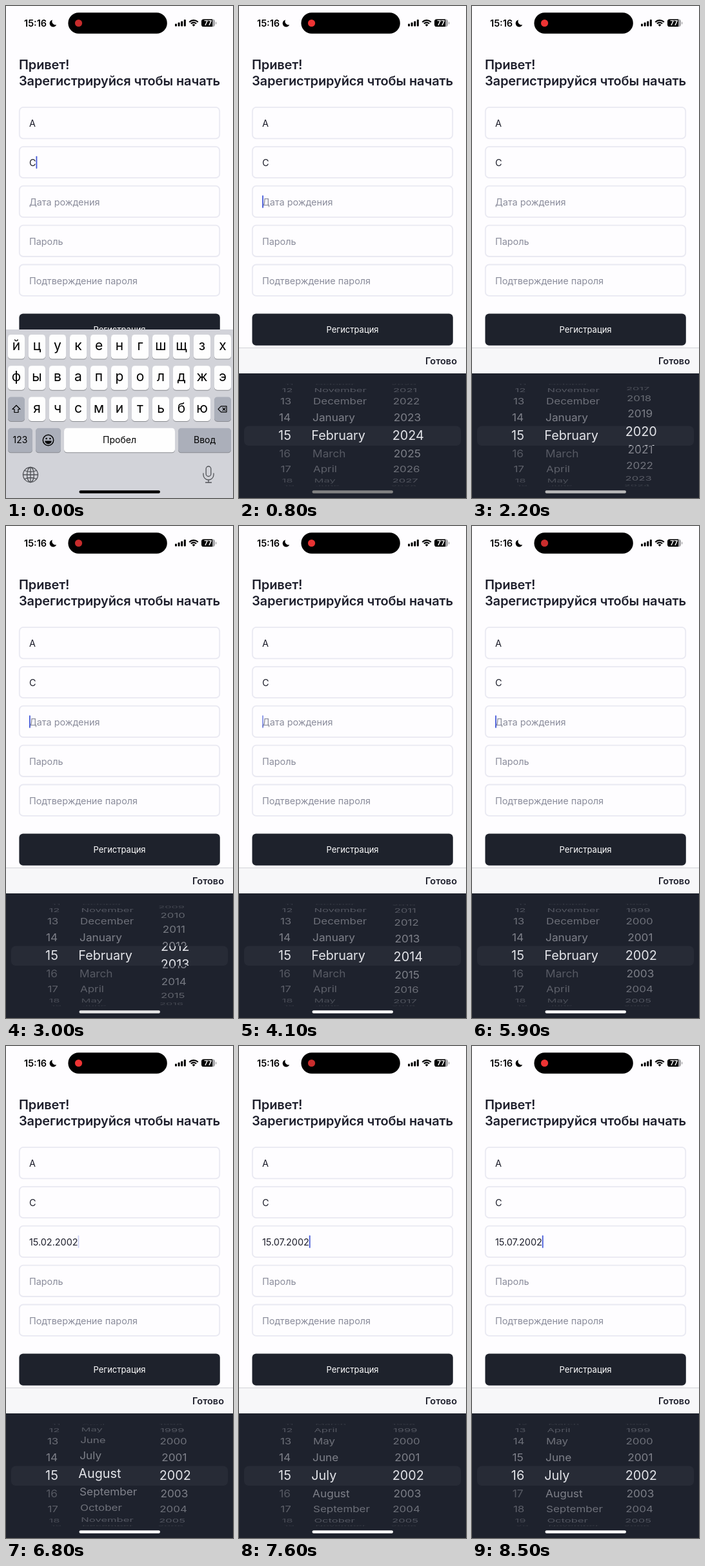
These frames come from a looping animation (352x762 px, 8.6 s). An HTML page with a canvas:

```html
<!DOCTYPE html>
<html lang="ru">
<head>
<meta charset="utf-8">
<title>Регистрация</title>
<style>
html, body { margin: 0; width: 100%; height: 100%; overflow: hidden; background: #fefdff; }
canvas { display: block; width: 352px; height: 762px; }
</style>
</head>
<body>
<canvas id="stage"></canvas>
<script>
const W = 352, H = 762, LOOP = 8600;
const canvas = document.getElementById('stage');
const ctx = canvas.getContext('2d');
const dpr = window.devicePixelRatio || 1;
canvas.width = W * dpr;
canvas.height = H * dpr;

const FONT = 'Inter, "Noto Sans", sans-serif';
const INK = '#1e1f2c', DARK = '#1e222d';
const MONTHS = ['January', 'February', 'March', 'April', 'May', 'June', 'July',
  'August', 'September', 'October', 'November', 'December'];

// Wheel positions over time: [ms, value]
const YEAR = [[2000, 2024], [2200, 2020.25], [2500, 2015.8], [2800, 2013.1], [3000, 2012.5],
  [3300, 2012], [3450, 2012], [3850, 2014], [4000, 2014], [4100, 2013.93], [4300, 2011.5],
  [4600, 2007.5], [5000, 2004], [5400, 2002.4], [5750, 2002]];
const MONTH = [[6200, 2], [6350, 3.5], [6650, 8.6], [6800, 8.1], [7050, 7.3], [7350, 7]];
const DAY = [[7550, 15], [7750, 15.1], [8200, 15.8], [8480, 16]];
const HOME = [[500, 0], [800, 130], [2200, 185], [3000, 230], [3500, 255]];
const FOCUS = 550, DATE_SET = 6000, DATE_EDIT = 7350;

const clamp = (v, a = 0, b = 1) => Math.min(b, Math.max(a, v));
const smooth = v => { v = clamp(v); return v * v * (3 - 2 * v); };

// Monotone cubic interpolation
function curve(keys, t) {
  const n = keys.length - 1;
  if (t <= keys[0][0]) return keys[0][1];
  if (t >= keys[n][0]) return keys[n][1];
  let i = 0;
  while (t > keys[i + 1][0]) i++;
  const slope = j => (keys[j + 1][1] - keys[j][1]) / (keys[j + 1][0] - keys[j][0]);
  const tangent = j => {
    if (j === 0 || j === n) return 0;
    const a = slope(j - 1), b = slope(j);
    return a * b <= 0 ? 0 : 2 * a * b / (a + b);
  };
  const [t0, v0] = keys[i], [t1, v1] = keys[i + 1], d = t1 - t0;
  const u = (t - t0) / d, u2 = u * u, u3 = u2 * u;
  return (2 * u3 - 3 * u2 + 1) * v0 + (u3 - 2 * u2 + u) * d * tangent(i)
    + (3 * u2 - 2 * u3) * v1 + (u3 - u2) * d * tangent(i + 1);
}

function box(x, y, w, h, r, fill) {
  ctx.beginPath();
  ctx.roundRect(x, y, w, h, r);
  ctx.fillStyle = fill;
  ctx.fill();
}

function disc(x, y, r, fill) {
  ctx.beginPath();
  ctx.arc(x, y, r, 0, Math.PI * 2);
  ctx.fillStyle = fill;
  ctx.fill();
}

function text(str, x, y, size, color, { weight = 400, align = 'left', spacing = 0 } = {}) {
  ctx.font = `${weight} ${size}px ${FONT}`;
  ctx.letterSpacing = spacing + 'px';
  ctx.textAlign = align;
  ctx.fillStyle = color;
  ctx.fillText(str, x, y);
}

function line(path, color, width) {
  ctx.strokeStyle = color;
  ctx.lineWidth = width;
  ctx.lineCap = ctx.lineJoin = 'round';
  ctx.stroke(new Path2D(path));
}

function statusBar(t) {
  text('15:16', 28, 31.5, 14.5, '#000', { weight: 600 });
  ctx.fillStyle = '#000';
  ctx.fill(new Path2D('M72 21.5A5.5 5.5 0 1 0 78.2 29A5.3 5.3 0 0 1 72 21.5Z'));
  box(96.4, 10.3, 153.4, 32.5, 16.2, '#000');
  const glow = clamp(0.75 - 0.75 * Math.cos(t / 1500 * Math.PI * 2));
  disc(112.5, 26.5, 5.6, `rgb(${198 + 40 * glow}, ${44 + 8 * glow}, ${44 + 8 * glow})`);

  [4, 6, 8, 10.5].forEach((h, i) => box(262 + i * 4.6, 31.5 - h, 3, h, 0.9, '#000'));

  ctx.strokeStyle = '#000';
  ctx.lineCap = 'butt';
  ctx.lineWidth = 2.1;
  for (const r of [9.2, 5.7]) {
    ctx.beginPath();
    ctx.arc(291, 31.3, r, -Math.PI * 0.76, -Math.PI * 0.24);
    ctx.stroke();
  }
  ctx.fillStyle = '#000';
  ctx.fill(new Path2D('M291 31.8L288.6 29.2A3.4 3.4 0 0 1 293.4 29.2Z'));

  box(303, 20.5, 21, 11.5, 3.6, '#a5a5a8');
  box(303, 20.5, 17, 11.5, [3.6, 0, 0, 3.6], '#000');
  box(325, 24.5, 1.3, 3.8, 0.6, '#a5a5a8');
  text('77', 313.2, 30.1, 10.2, '#fff', { weight: 700, align: 'center' });
}

function caretAlpha(t) {
  const start = t < FOCUS ? 0 : t < DATE_SET ? FOCUS : t < DATE_EDIT ? DATE_SET : DATE_EDIT;
  const p = (t - start) % 1000;
  if (p < 500) return 1;
  return p < 700 ? clamp(1 - (p - 500) / 150) : clamp((p - 760) / 160);
}

function form(t) {
  const title = { weight: 600, spacing: -0.13 };
  text('Привет!', 20, 98, 20, INK, title);
  text('Зарегистрируйся чтобы начать', 20, 123, 20, INK, title);

  const date = t < DATE_SET ? '' : t < DATE_EDIT ? '15.02.2002' : '15.07.2002';
  const fields = [['А', ''], ['С', ''], [date, 'Дата рождения'], ['', 'Пароль'],
    ['', 'Подтверждение пароля']];
  const active = t < FOCUS ? 1 : 2;
  fields.forEach(([value, hint], i) => {
    const y = 156 + i * 60.9;
    ctx.beginPath();
    ctx.roundRect(20.8, y + 0.9, 310.4, 48.4, 6);
    ctx.fillStyle = '#fefdff';
    ctx.fill();
    ctx.strokeStyle = '#e9e9f2';
    ctx.lineWidth = 1.8;
    ctx.stroke();
    text(value || hint, 36, y + 31, 14.4, value ? INK : '#8a8c9b');
    if (i === active) {
      const x = 36 + (value ? ctx.measureText(value).width : 0);
      ctx.globalAlpha = caretAlpha(t);
      box(x, y + 15.5, 1.8, 19.5, 0.9, '#4459d8');
      ctx.globalAlpha = 1;
    }
  });

  box(20.4, 476.5, 311.4, 49.3, 6, '#1e222c');
  text('Регистрация', 176, 506.3, 13, '#fff', { align: 'center' });
}

function key(x, y, w, label, size = 14, dark = false) {
  box(x, y + 1, w, 37.5, 4.6, '#898b90');
  box(x, y, w, 37.5, 4.6, dark ? '#abafba' : '#fefefe');
  if (label) text(label, x + w / 2, y + (size > 16 ? 24.2 : 23.2), size, '#000', { align: 'center' });
}

function keyboard() {
  ctx.fillStyle = '#d2d3d9';
  ctx.fillRect(0, 501, W, 300);
  ['йцукенгшщзх', 'фывапролджэ', ' ячсмитьбю '].forEach((row, r) => {
    [...row].forEach((ch, i) => key(3 + i * 32, 509 + r * 48.2, 26, ch.trim(), 21, ch === ' '));
  });
  key(3, 653.8, 38, '123', 14, true);
  key(46, 653.8, 39, '', 14, true);
  key(90, 653.8, 172, 'Пробел');
  key(267, 653.8, 82, 'Ввод', 14, true);

  line('M16 618.5L10 624.5H13V629.5H19V624.5H22Z', '#000', 1.2);
  line('M329 624.3L333.4 619.8H342V628.8H333.4ZM336 622.3L340 626.3M340 622.3L336 626.3', '#000', 1.2);

  ctx.beginPath();
  ctx.arc(65.5, 672.5, 8.2, 0, Math.PI * 2);
  ctx.strokeStyle = '#000';
  ctx.lineWidth = 1.5;
  ctx.stroke();
  disc(62.6, 670, 1.3, '#000');
  disc(68.4, 670, 1.3, '#000');
  ctx.fill(new Path2D('M60.3 673.5H70.7A5.2 5 0 0 1 60.3 673.5Z'));

  const grey = '#505257';
  ctx.strokeStyle = grey;
  ctx.lineWidth = 1.3;
  for (const rx of [11.5, 5.4]) {
    ctx.beginPath();
    ctx.ellipse(38, 726, rx, 11.5, 0, 0, Math.PI * 2);
    ctx.stroke();
  }
  line('M38 714.5V737.5M26.5 726H49.5M29 719.5Q38 723.5 47 719.5M29 732.5Q38 728.5 47 732.5', grey, 1.3);
  ctx.beginPath();
  ctx.roundRect(310.2, 713, 7.6, 15.5, 3.8);
  ctx.stroke();
  line('M306 724V726A8 8 0 0 0 322 726V724M314 734V738M309.5 738H318.5', grey, 1.3);
}

const AXIS = 665, RADIUS = 79, STEP = 0.362;
const BAND_TOP = 650.5, BAND_END = 681;

function rows({ pos, label, x, align, dim }, zoom) {
  const mid = Math.round(pos);
  const size = zoom ? 19.8 : 17.3;
  for (let i = mid - 4; i <= mid + 4; i++) {
    const angle = (i - pos) * STEP, depth = Math.cos(angle);
    if (depth <= 0.03) continue;
    const scale = 1 - 0.08 * (1 - depth);
    const k = i - mid;
    const shade = k === 1 ? 1 - 0.42 * dim : k > 1 ? 1 - 0.2 * dim : 1;
    ctx.save();
    ctx.translate(W / 2, AXIS + RADIUS * Math.sin(angle));
    ctx.scale(scale, depth);
    ctx.globalAlpha = zoom ? 0.92 : (0.06 + 0.42 * depth) * shade;
    text(label(i), x[zoom ? 1 : 0] - W / 2, size * 0.364, size, '#f4f5fa', { align });
    ctx.restore();
  }
}

function picker(t) {
  ctx.fillStyle = '#f7f7f9';
  ctx.fillRect(0, 529, W, 40);
  ctx.fillStyle = '#d3d3d8';
  ctx.fillRect(0, 529, W, 1);
  text('Готово', 338, 554.8, 14.5, INK, { weight: 600, align: 'right' });
  ctx.fillStyle = DARK;
  ctx.fillRect(0, 569, W, 240);
  box(8, BAND_TOP, 336, BAND_END - BAND_TOP, 7, '#272b36');

  const cols = [
    { pos: curve(DAY, t), label: String, x: [70.5, 71], align: 'center', dim: 1 },
    { pos: curve(MONTH, t), label: i => MONTHS[(i + 23) % 12], x: [113.8, 112.3], align: 'left',
      dim: 1 - clamp((t - 6200) / 100) },
    { pos: curve(YEAR, t), label: String, x: [261.3, 262.3], align: 'center', dim: 0 }
  ];
  for (const zoom of [false, true]) {
    ctx.save();
    ctx.beginPath();
    if (zoom) ctx.rect(0, BAND_TOP, W, BAND_END - BAND_TOP);
    else {
      ctx.rect(0, 584, W, BAND_TOP - 584);
      ctx.rect(0, BAND_END, W, 745 - BAND_END);
    }
    ctx.clip();
    cols.forEach(col => rows(col, zoom));
    ctx.restore();
  }
}

function draw(t) {
  ctx.setTransform(dpr, 0, 0, dpr, 0, 0);
  ctx.globalAlpha = 1;
  ctx.fillStyle = '#fefdff';
  ctx.fillRect(0, 0, W, H);
  statusBar(t);
  form(t);

  const swap = smooth((t - 500) / 300);
  if (swap > 0) {
    ctx.save();
    ctx.translate(0, -28 * (1 - swap));
    picker(t);
    ctx.restore();
  }
  if (swap < 1) {
    ctx.save();
    ctx.globalAlpha = 1 - swap;
    ctx.translate(0, 28 * swap);
    keyboard();
    ctx.restore();
  }
  const tone = Math.round(curve(HOME, t));
  box(113.5, 750.3, 125.5, 4.4, 2.2, `rgb(${tone}, ${tone}, ${tone})`);
}

const begin = performance.now();
function tick() {
  draw((performance.now() - begin) % LOOP);
  requestAnimationFrame(tick);
}
tick();
</script>
</body>
</html>
```
